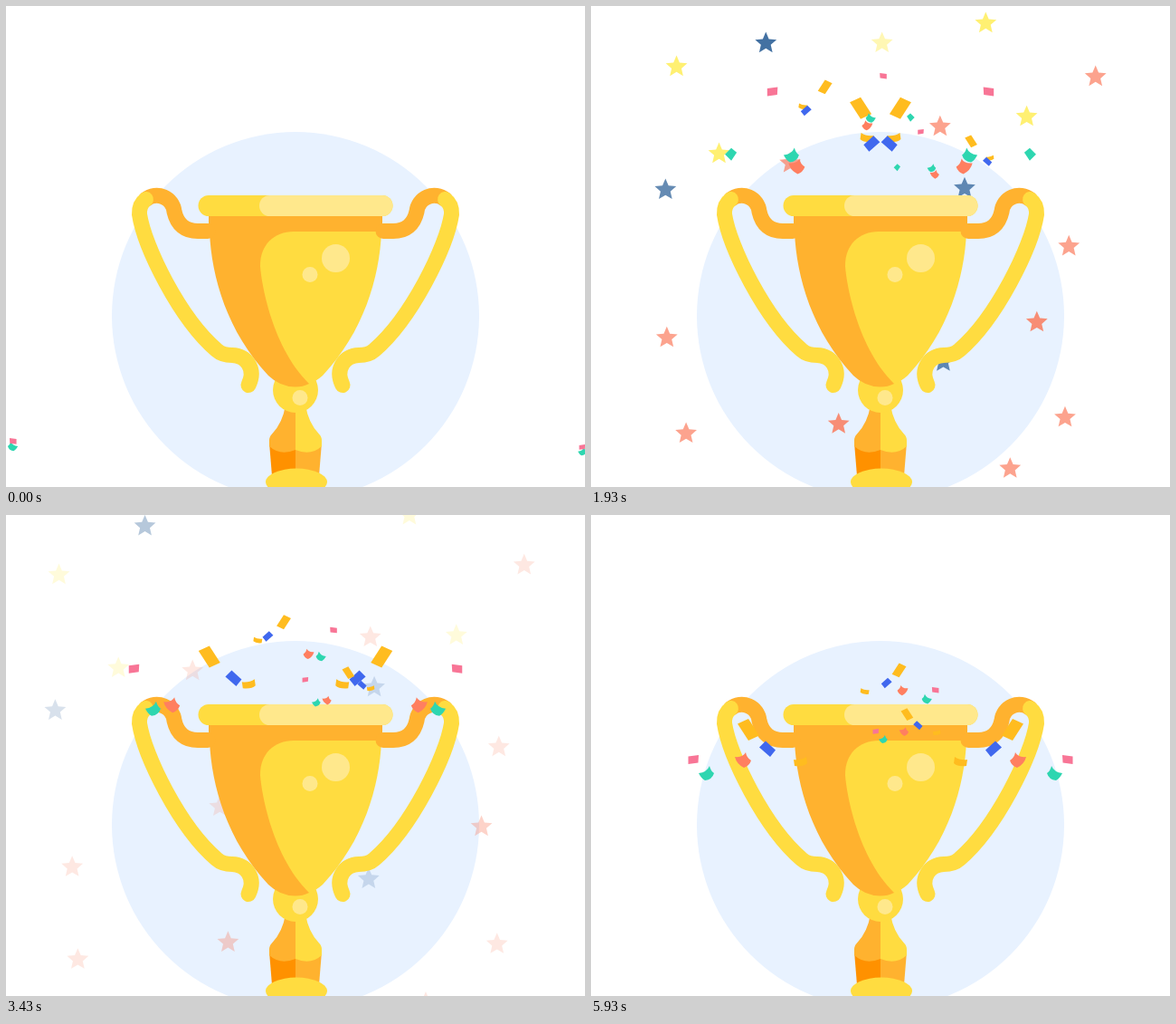
These frames come from a looping animation (640 by 531 pixels, 6000 ms). An HTML page with a canvas:

```html
<!DOCTYPE html>
<html>
<head>
<meta charset="utf-8">
<style>
html, body { margin: 0; width: 100%; height: 100%; overflow: hidden; background: #fff }
canvas { display: block }
</style>
</head>
<body>
<canvas id="stage" width="640" height="531"></canvas>
<script>
const ctx = document.getElementById('stage').getContext('2d');
const LOOP = 6, BURST_END = 1.21, FALL_END = 5.93;
const YELLOW = '#ffdc40', ORANGE = '#ffb22f', DARK = '#ff9100', LIGHT = '#ffe88c';
const GOLD = '#ffbc1f', GREEN = '#2ed6b0';

const fill = (color, d) => { ctx.fillStyle = color; ctx.fill(new Path2D(d)); };
const stroke = (color, d) => { ctx.strokeStyle = color; ctx.stroke(new Path2D(d)); };
const oval = (color, x, y, rx, ry = rx) => {
  ctx.fillStyle = color;
  ctx.beginPath();
  ctx.ellipse(x, y, rx, ry, 0, 0, 7);
  ctx.fill();
};
const bar = (color, x, y, w, h) => {
  ctx.fillStyle = color;
  ctx.beginPath();
  ctx.roundRect(x, y, w, h, h / 2);
  ctx.fill();
};
const place = (s = 1, x = 0, y = 0) => ctx.setTransform(s, 0, 0, Math.abs(s), x, y);
const clamp = v => Math.max(0, Math.min(1, v));
const mix = (a, b, k) => a + (b - a) * k;
// Eases a particle from its launch point on to its drifting path.
const launched = (t, t0, power) => 1 - (1 - clamp((t - t0) / (BURST_END - t0))) ** power;

// Stars: where each one is after the burst, where it comes to rest, and when it has faded.
const STAR_START = .3, STAR_REST = 4;
const stars = {
  '#ffe92e': [
    [156, 69, 58, 66], [171, 153, 124, 169], [311, 103, 328, 4, 3],
    [420, 51, 446, 0], [454, 104, 498, 133]
  ],
  '#1b538e': [
    [261, 90, 153, 12, 4.4], [130, 181, 54, 216], [423, 220, 407, 190], [370, 377, 401, 402]
  ],
  '#fa7757': [
    [532, 117, 573, 55], [357, 130, 403, 135], [244, 176, 206, 172], [500, 281, 545, 256],
    [102, 328, 73, 389], [149, 440, 79, 491], [492, 421, 543, 474], [462, 463, 464, 539],
    [437, 358, 526, 344, 4.4], [322, 444, 245, 472, 4.4], [300, 324, 236, 322]
  ]
};
const starPath = 'M' + Array.from({ length: 10 }, (_, i) => {
  const a = i * Math.PI / 5, r = i % 2 ? 5.7 : 12.5;
  return [r * Math.sin(a), -r * Math.cos(a)];
}).join('L') + 'Z';

function drawStars(t) {
  if (t < STAR_START) return;
  const left = Math.max(0, (STAR_REST - t) / (STAR_REST - BURST_END)) ** 3.3;
  const out = launched(t, STAR_START, 2);
  for (const color in stars) for (const [x0, y0, x1, y1, gone = 3.95] of stars[color]) {
    ctx.globalAlpha = clamp((gone - t) / 3);
    place(1, mix(320, mix(x1, x0, left), out), mix(300, mix(y1, y0, left), out));
    fill(color, starPath);
  }
  ctx.globalAlpha = 1;
  place();
}

// Confetti: one burst, shown four times at different sizes.
const bursts = [[1, 0, 0], [-1, 640, 0], [.66, 33, 15], [-.57, 615, 85]];
const AWAY = [-75, 712];
const bits = [
  { color: GOLD, from: [260, 134], to: [409, 272], drag: 2.2, lift: .65,
    d: 'M-7-5Q-1-1 7-2L6 5Q-4 6-8 2Z' },
  { color: GOLD, from: [296, 99], to: [466, 237], drag: 1.9, lift: .5,
    d: 'M0-12L12-6.500 0 12-12 6.500Z' },
  { color: GREEN, from: [442, 142], to: [588, 299], drag: 2.1, lift: .2, gone: 3,
    d: 'M0-7L7 0 0 7-6-2Z' },
  { color: '#4068ee', from: [262, 148], to: [445, 258], drag: 1.85, lift: 1,
    d: 'M2-8.500L9-1.500-3 9-9 1.500Z' },
  { color: GREEN, from: [379, 145], to: [512, 285], drag: 2.1, lift: .2, start: [-41, 717],
    d: 'M-3-8Q0-1 9 0Q6 6 2 8Q-6 7-8 0Q-4-3-3-8Z' },
  { color: '#ff7f60', from: [376, 166], to: [472, 270], drag: 2.9, lift: .5,
    d: 'M-3-8Q0-2 9-3Q7 5-1 9Q-7 7-9 1Q-4-2-3-8Z' },
  { color: '#f87596', from: [397, 63], to: [527, 270], drag: 2.4, lift: .1, start: [-40, 709],
    d: 'M-6-5L5.500-3.500 5.500 5-5.500 3.500Z' }
];

function drawConfetti(t) {
  const s = Math.min(1, (t - BURST_END) / (FALL_END - BURST_END));
  const out = launched(t, 0, 7);
  for (const [size, ox, oy] of bursts) for (const bit of bits) {
    const { from, to, drag, lift, gone, start = AWAY } = bit;
    const drift = 1 - (1 - s) ** drag;
    const fall = s + s * (1 - s) * (.6 * s - lift);
    const x = mix(start[0], mix(from[0], to[0], drift), out);
    const y = mix(start[1], mix(from[1], to[1], fall), out);
    ctx.globalAlpha = gone ? clamp((gone - t) / .7) : 1;
    place(size, ox + size * x, oy + Math.abs(size) * y);
    fill(bit.color, bit.d);
  }
  ctx.globalAlpha = 1;
  place();
}

function drawTrophy() {
  // stem and base
  fill(DARK, 'M291 482L295 531H320V480Z');
  fill(ORANGE, 'M349 482L345 531H320V480Z');
  fill(ORANGE, 'M309 440Q306 460 294 472.500Q291 475 291 480V486Q303 497 320 490V440Z');
  fill(YELLOW, 'M331 440Q334 460 346 472.500Q349 475 349 480V486Q337 497 320 490V440Z');
  oval(YELLOW, 321, 525.5, 34, 15);
  oval(YELLOW, 320, 424, 25);
  oval(LIGHT, 325, 432.5, 8.5);
  // cup
  fill(ORANGE, 'M224 230H416V249H415L335 417Q328 420.500 320 420.500Q303 420.500 290 408C245 360 227 300 225 249H224Z');
  fill(YELLOW, 'M415 249H318C296 249 281 264 281 286C281 296 291 374 335 417Q342 415 350 408C395 360 413 300 415 249Z');
  oval(LIGHT, 364.5, 278.5, 15.5);
  oval(LIGHT, 336, 296.5, 8.5);
  // handles
  ctx.lineWidth = 17;
  ctx.lineCap = 'round';
  for (const side of [1, -1]) {
    place(side, side > 0 ? 0 : 640, 0);
    stroke(ORANGE, 'M154.500 213.500A19.500 19.500 0 0 1 186 227Q191 248.500 212 248.500H223');
    stroke(YELLOW, 'M154.500 213.500Q147 219 147.500 230C153 266 192 345 233 380Q239 385.500 250 385.500C265 386 277 400 268 418.500');
  }
  place();
  bar(YELLOW, 212.5, 209, 215, 23);
  bar(LIGHT, 280, 209, 147.5, 23);
}

function frame() {
  const t = performance.now() / 1000 % LOOP;
  ctx.clearRect(0, 0, 640, 531);
  oval('#e8f2ff', 320, 342, 203);
  drawStars(t);
  drawTrophy();
  drawConfetti(t);
  requestAnimationFrame(frame);
}
frame();
</script>
</body>
</html>
```
